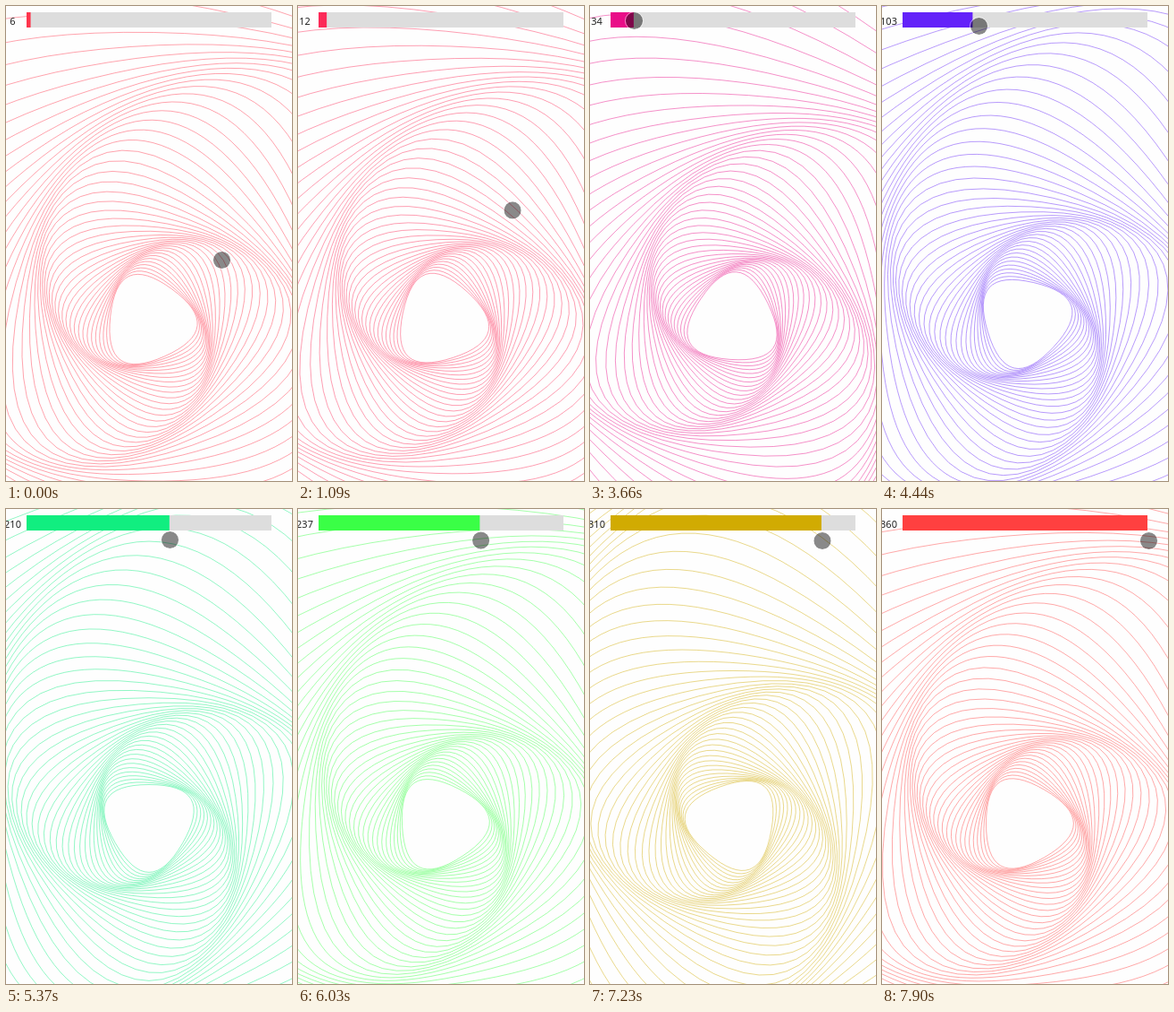
Recreate the animation shown at these times as an HTML page with a canvas. Size 320 by 530 pixels, loop 8 s.

```html
<!DOCTYPE html>
<html lang="en">
<head>
<meta charset="utf-8">
<title>Twisted triangles</title>
<style>
  html, body { margin: 0; width: 320px; height: 530px; overflow: hidden; background: #fefefe; }
  canvas { position: absolute; left: 0; top: 0; width: 320px; height: 530px; }
  #value {
    position: absolute; left: -12px; top: 9px; width: 39px;
    font: 11px/15px "Noto Sans", "Open Sans", sans-serif;
    text-align: center; color: #222;
  }
</style>
</head>
<body>
<canvas id="stage"></canvas>
<div id="value"></div>
<script>
const W = 320, H = 530, LOOP = 8000;
const STEP = 130; // the picture is held for about this long
const LEAD = 16;  // one display refresh
const CENTER = { x: 160, y: 351 };
const RINGS = 50, RADIUS = 87, GROWTH = 1.05, TWIST = 5;
const BAR = { x: 23, y: 7, w: 274, h: 17 };

// The pointer wanders to the slider, then drags it to the end
const KEYS = [
  { t: 0, value: 6, x: 241, y: 283 },
  { t: 2180, value: 18, x: 238, y: 165 },
  { t: 3660, value: 34, x: 49, y: 16 },
  { t: 4440, value: 103, x: 108, y: 22 },
  { t: 5370, value: 210, x: 183, y: 34 },
  { t: 6570, value: 259, x: 221, y: 35 },
  { t: 7900, value: 360, x: 298, y: 35 }
];

const canvas = document.getElementById("stage");
const label = document.getElementById("value");
const ctx = canvas.getContext("2d");
const ratio = window.devicePixelRatio || 1;
canvas.width = W * ratio;
canvas.height = H * ratio;
ctx.scale(ratio, ratio);

function stateAt(time) {
  const next = KEYS.findIndex(k => k.t > time);
  if (next < 0) return KEYS[KEYS.length - 1];
  const a = KEYS[next - 1], b = KEYS[next];
  const steps = Math.round((b.t - a.t) / STEP);
  const p = Math.floor((time - a.t) / (b.t - a.t) * steps) / steps;
  const mix = name => a[name] + (b[name] - a[name]) * p;
  return { value: Math.round(mix("value")), x: mix("x"), y: mix("y") };
}

// Cyclic rainbow of three squared sines
function rainbow(t) {
  const angle = (0.5 - t) * Math.PI;
  const part = k => Math.round(255 * Math.sin(angle + k * Math.PI / 3) ** 2);
  return `rgb(${part(0)},${part(1)},${part(2)})`;
}

// Triangle rounded by quadratic curves between its edge midpoints
function strokeRing(radius, degrees) {
  const corner = k => {
    const a = (degrees + 120 * k) * Math.PI / 180;
    return [CENTER.x + radius * Math.cos(a), CENTER.y + radius * Math.sin(a)];
  };
  const middle = (p, q) => [(p[0] + q[0]) / 2, (p[1] + q[1]) / 2];
  const pts = [0, 1, 2].map(corner);
  ctx.beginPath();
  ctx.moveTo(...middle(pts[2], pts[0]));
  pts.forEach((p, k) => ctx.quadraticCurveTo(...p, ...middle(p, pts[(k + 1) % 3])));
  ctx.closePath();
  ctx.stroke();
}

function drawSpiral(value, color) {
  ctx.globalAlpha = 0.5;
  ctx.strokeStyle = color;
  ctx.lineWidth = 0.9;
  for (let i = 0; i < RINGS; i++) strokeRing(RADIUS * GROWTH ** i, value + TWIST * i);
  ctx.globalAlpha = 1;
}

function drawBar(value, color) {
  ctx.fillStyle = "#ddd";
  ctx.fillRect(BAR.x, BAR.y, BAR.w, BAR.h);
  ctx.fillStyle = color;
  ctx.fillRect(BAR.x, BAR.y, BAR.w * value / 360, BAR.h);
}

function drawPointer(x, y) {
  const disc = r => {
    ctx.beginPath();
    ctx.arc(x + 0.5, y + 0.5, r, 0, 2 * Math.PI);
  };
  disc(9.6);
  ctx.fillStyle = "rgba(0,0,0,0.46)";
  ctx.fill();
  disc(10.1);
  ctx.strokeStyle = "rgba(255,255,255,0.5)";
  ctx.lineWidth = 1;
  ctx.stroke();
}

function draw({ value, x, y }) {
  const color = rainbow(1 - value / 360);
  ctx.fillStyle = "#fefefe";
  ctx.fillRect(0, 0, W, H);
  drawSpiral(value, color);
  drawBar(value, color);
  drawPointer(x, y);
  label.textContent = value;
}

const start = performance.now() - LEAD;
function frame() {
  draw(stateAt((performance.now() - start) % LOOP));
  requestAnimationFrame(frame);
}
frame();
</script>
</body>
</html>
```
